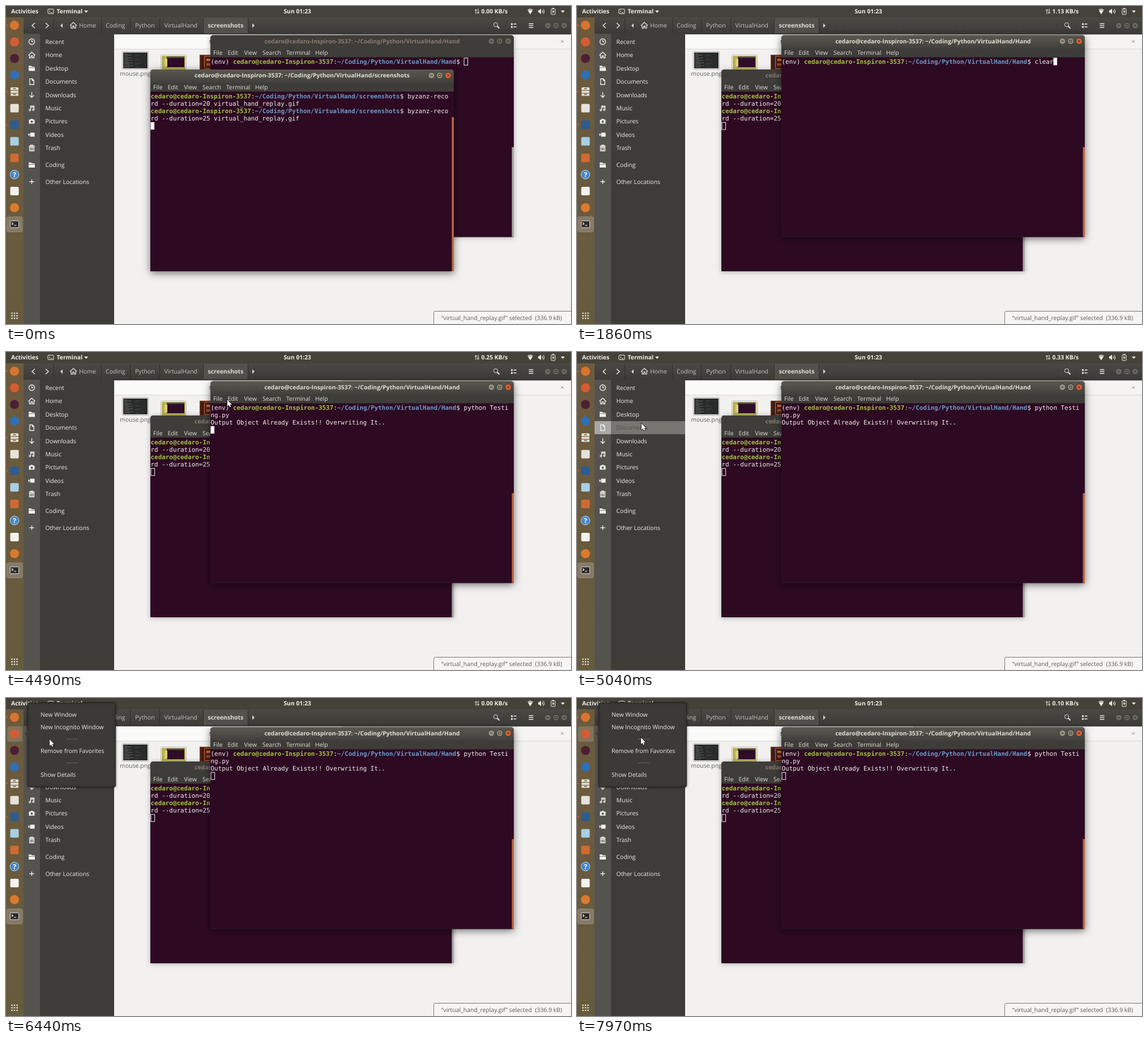
Recreate the animation shown at these times as an HTML page with a canvas. Size 998x561 px, loop 8000 ms.

```html
<!DOCTYPE html>
<html lang="en">
<head>
<meta charset="utf-8">
<title>Desktop session</title>
<style>
  html, body { margin: 0; width: 100%; height: 100%; overflow: hidden; background: #f2f1f0; }
  canvas { display: block; }
</style>
</head>
<body>
<canvas id="stage" width="998" height="561"></canvas>
<script>
const LOOP = 8000;
const ctx = document.getElementById('stage').getContext('2d');
const UI = '"Open Sans", "Noto Sans", sans-serif';
const MONO = '"DejaVu Sans Mono", monospace';
const CELL = 6.575, LINE = 13.15;
const USER = 'cedaro', HOST = USER + '@' + USER + '-Inspiron-3537';
const DIR = '~/Coding/Python/VirtualHand/';

// ---------- drawing helpers ----------
function rect(x, y, w, h, fill) {
  ctx.fillStyle = fill;
  ctx.fillRect(x, y, w, h);
}
function round(x, y, w, h, r, fill, stroke) {
  ctx.beginPath();
  ctx.roundRect(x, y, w, h, r);
  if (fill) { ctx.fillStyle = fill; ctx.fill(); }
  if (stroke) { ctx.strokeStyle = stroke; ctx.lineWidth = 1; ctx.stroke(); }
}
function circle(x, y, r, fill, stroke) {
  ctx.beginPath();
  ctx.arc(x, y, r, 0, 7);
  if (fill) { ctx.fillStyle = fill; ctx.fill(); }
  if (stroke) { ctx.strokeStyle = stroke; ctx.lineWidth = 0.9; ctx.stroke(); }
}
function shade(y, h, top, bottom) {
  const g = ctx.createLinearGradient(0, y, 0, y + h);
  g.addColorStop(0, top);
  g.addColorStop(1, bottom);
  return g;
}
// y is the middle of the capital letters
function label(str, x, y, color, { bold = false, size = 10.45, align = 'left' } = {}) {
  ctx.font = (bold ? 'bold ' : '') + size + 'px ' + UI;
  ctx.textAlign = align;
  ctx.fillStyle = color;
  ctx.fillText(str, x, y + size * 0.36);
}
function mono(str, x, y, color, bold) {
  ctx.font = (bold ? 'bold ' : '') + '10.92px ' + MONO;
  ctx.textAlign = 'left';
  ctx.fillStyle = color;
  ctx.fillText(str, x, y + 10.6);
  return x + str.length * CELL;
}
function icon(d, x, y, color, filled, width = 1.3) {
  const path = new Path2D(d);
  ctx.save();
  ctx.translate(x, y);
  ctx.lineWidth = width;
  ctx.strokeStyle = ctx.fillStyle = color;
  filled ? ctx.fill(path) : ctx.stroke(path);
  ctx.restore();
}

// ---------- pointer ----------
const track = [
  [400, 722, 460], [820, 778, 366], [960, 778, 366], [1360, 857, 281], [1820, 857, 281],
  [2900, 858, 134], [3480, 730, 89], [3630, 730, 89], [4390, 420, 80], [4440, 420, 80],
  [4800, 215, 112], [5040, 114, 126], [5250, 106, 123], [5600, 16, 62], [5950, 16, 62],
  [6440, 77, 73], [6770, 77, 73], [6820, 78, 72], [7050, 78, 72], [7290, 97, 57],
  [7600, 109, 74], [7810, 109, 74], [7970, 113, 70]
];
function pointerAt(t) {
  if (t < 400 || (t >= 1820 && t < 2900)) return null;
  const i = track.findIndex(k => k[0] > t);
  if (i < 0) return track.at(-1).slice(1);
  const [t0, x0, y0] = track[i - 1], [t1, x1, y1] = track[i];
  const p = (t - t0) / (t1 - t0);
  return [x0 + (x1 - x0) * p, y0 + (y1 - y0) * p];
}
function drawPointer([x, y]) {
  const inside = (l, t, r, b) => x > l && x < r && y > t && y < b;
  if (inside(361, 91, 893, 407) || inside(255, 151, 787, 468)) {
    icon('M-2.5-5.5H-.6M.6-5.5H2.5M0-5.5V5.5M-2.5 5.5H-.6M.6 5.5H2.5', x, y, '#e8e6e8', false, 1);
    return;
  }
  const arrow = 'M0 0V11.2L2.6 8.9 4.3 12.7 6.2 11.8 4.5 8.2H8Z';
  icon(arrow, x, y, '#161616', false, 1.5);
  icon(arrow, x, y, '#fff', true);
}

// ---------- panel and dock ----------
const speeds = [[0, '0.00'], [590, '0.49'], [1590, '1.13'], [2590, '0.00'], [3570, '0.25'],
  [4590, '0.33'], [5590, '0.66'], [6400, '0.00'], [7590, '0.10']];

function drawPanel(t) {
  const white = '#f2f0ea', bold = { bold: true, size: 10.35 };
  rect(0, 0, 998, 20, '#45423a');
  label('Activities', 9, 9.5, white, bold);
  round(74, 5.5, 10, 8, 1, null, white);
  icon('M76 8l2 1.6-2 1.6M79 11.5h3', 0, 0, white, false, 0.9);
  label('Terminal', 89.5, 9.5, white, bold);
  icon('M0 0H7L3.5 4Z', 138, 8, white, true);
  label('Sun 01:23', 514.7, 9.5, white, { ...bold, align: 'center' });
  icon('M2 9V1M0 3.2L2 .8 4 3.2M6 0V8M4 5.8L6 8.2 8 5.8', 828, 5, white, false, 1);
  label(speeds.findLast(s => s[0] <= t)[1] + ' KB/s', 839.5, 9.5, white, bold);
  icon('M-5-4Q0-8 5-4L0 4Z', 926, 10.5, '#b5b1a7', true);
  icon('M-3.5-1.5Q0-4 3.5-1.5L0 4Z', 926, 10.5, white, true);
  icon('M-5-2H-3L0-5V5L-3 2H-5Z', 945, 9.5, white, true);
  icon('M2-2Q3.5 0 2 2M4-4Q7 0 4 4', 945, 9.5, white, false, 1.1);
  round(963, 5, 7, 10, 1, null, white);
  rect(965, 3.5, 3, 1.5, white);
  icon('M4 0L1.5 4H3.5L2.5 7 6 2.8H4Z', 963, 6.5, white, true);
  icon('M0 0H7L3.5 4Z', 980, 8, white, true);
}

const dockIcons = [
  ['circle', '#d9742f'], ['circle', '#d65b35'], ['circle', '#4b2035'], ['circle', '#2f6fb6'], ['files'],
  ['square', '#e5e2db'], ['square', '#2d5c8e'], ['square', '#a9cfe3'], ['square', '#cf6a34'], ['help'],
  ['square', '#f4f3ef'], ['circle', '#dc7a2c'], ['terminal']
];
function drawDock(menuOpen) {
  rect(0, 20, 31, 541, shade(20, 541, '#6d5a3e', '#675b3e'));
  if (menuOpen) round(2, 50, 27, 27, 3, '#81745c');
  round(1.5, 372, 27.5, 26.5, 3, '#857a68', '#958a76');
  dockIcons.forEach(([kind, color], i) => {
    const y = 34 + i * 29.25;
    if (kind === 'circle') circle(15, y, 8, color);
    if (kind === 'square') round(7.5, y - 7.5, 15, 15, 2, color);
    if (kind === 'files') {
      round(8, y - 7.5, 14, 15, 1.5, '#e9e3d3');
      rect(8, y - 2.5, 14, 1.2, '#675e50');
      rect(8, y + 2.3, 14, 1.2, '#675e50');
      rect(12.5, y - 5.8, 5, 1.6, '#675e50');
      rect(12.5, y + 4.2, 5, 1.6, '#675e50');
    }
    if (kind === 'help') {
      circle(15, y, 7.8, '#4786c9', '#d4e1ee');
      label('?', 15, y, '#fff', { bold: true, size: 12, align: 'center' });
    }
    if (kind === 'terminal') {
      round(7.5, y - 6, 15, 12, 1.5, '#2c2b2a', '#e6e4de');
      icon('M10-3l2.5 2-2.5 2M14 2h4', 0, y, '#fff', false, 1.1);
    }
    if ([0, 4, 6, 12].includes(i)) circle(2, y, 1.3, '#dd5a2c');
  });
  for (let i = 0; i < 9; i++) circle(10.5 + (i % 3) * 4.5, 542 + Math.floor(i / 3) * 4.5, 1.3, '#f1eee6');
}

// ---------- file manager ----------
const HOME = 'M-6 .5L0-5 6 .5M-4 0V5H-1.2V1.5H1.2V5H4V0';
const FOLDER = 'M-5.5-4.5H-1L0-3H5V-1.5H-5.5ZM-5.5-.7H5.5V4.5H-5.5Z';
const places = [
  ['Recent', 'M5 0A5 5 0 1 1 -5 0A5 5 0 1 1 5 0M0-3V0H2.5', 63],
  ['Home', HOME, 86.5],
  ['Desktop', FOLDER, 110, true],
  ['Documents', 'M-3.7-5H1L3.7-2.2V5H-3.7ZM1-5V-2H3.7', 133.5],
  ['Downloads', 'M0-5V4M-3.8 .5L0 4.3 3.8 .5', 157],
  ['Music', 'M-2 3V-4H4V2.5M-2-2H4M-2 3A1.3 1.3 0 1 1 -4.6 3A1.3 1.3 0 1 1 -2 3M4 2.5A1.3 1.3 0 1 1 1.4 2.5A1.3 1.3 0 1 1 4 2.5', 180.5],
  ['Pictures', 'M-5-3H-2.5L-1.5-4.5H1.5L2.5-3H5V4H-5ZM2 .5A2 2 0 1 0 -2 .5A2 2 0 1 0 2 .5', 203.5, true],
  ['Videos', 'M-3-3.5H5V3.5H-3ZM-3 0L-6-2.5V2.5Z', 227, true],
  ['Trash', 'M-5-3.5H5M-2-3.5V-5.2H2V-3.5M-4-1.5V5H4V-1.5ZM-1.5-1V5M1.5-1V5', 250.5],
  ['Coding', FOLDER, 280.5, true],
  ['Other Locations', 'M-4 0H4M0-4V4', 310]
];
function drawSidebar(pointer) {
  rect(31, 49, 29, 512, '#55534e');
  rect(60, 49, 131, 512, '#3d3c38');
  for (const [name, path, y, filled] of places) {
    const over = pointer && pointer[0] > 31 && pointer[0] < 191 && Math.abs(pointer[1] - y) < 11.6;
    if (over) {
      rect(31, y - 11.5, 29, 23, '#a9a8a4');
      rect(60, y - 11.5, 131, 23, '#777671');
    }
    icon(path, 45.5, y, '#f3f2ee', filled);
    label(name, 69.5, y, over ? '#53524d' : '#f0efea');
  }
}
function drawHeader() {
  const tone = '#c6c3ba';
  rect(31, 20, 967, 30, shade(20, 30, '#4a4944', '#3b3a36'));
  rect(348, 21, 79, 27, '#53514c');
  for (const x of [84, 168, 219, 271, 348, 427]) rect(x, 21, 1, 27, '#2f2e2b');
  icon('M3-4.5L-2 0 3 4.5', 48, 34.5, '#e9e7e0', false, 1.5);
  icon('M-3-4.5L2 0-3 4.5', 73, 34.5, '#e9e7e0', false, 1.5);
  icon('M2-4L-2 0 2 4Z', 98, 34.5, '#d9d6cd', true);
  icon('M-2-4L2 0-2 4Z', 437, 34.5, '#d9d6cd', true);
  icon(HOME, 119, 34, '#e0ddd4');
  [['Home', 129], ['Coding', 176], ['Python', 228], ['VirtualHand', 279.5]]
    .forEach(([name, x]) => label(name, x, 34.5, tone, { size: 10.55 }));
  label('screenshots', 356.5, 34.5, '#dedbd2', { bold: true, size: 10.5 });
  circle(865, 33, 3.6, null, '#f0eee8');
  icon('M0 0L4 4', 867.5, 35.5, '#f0eee8', false, 1.8);
  for (const y of [30.5, 35.5]) {
    rect(892, y, 3, 3, '#e9e7e0');
    rect(896.5, y + 0.5, 5, 1.6, '#e9e7e0');
  }
  for (const y of [30.5, 33.7, 37]) rect(923.5, y, 8, 1.5, '#e9e7e0');
  drawButtons([957, 971.5, 986], 34.5, false);
}
function drawThumbnails() {
  round(205.5, 80.5, 46, 31, 1, '#fff', '#a5a4a2');
  rect(207, 82, 43, 28, '#2a2b2b');
  for (let row = 0; row < 11; row++) {
    rect(209, 84 + row * 2.3, 5 + (row * 7) % 13, 0.8, '#6b6d6c');
    if (row % 3) rect(228, 84 + row * 2.3, 3 + (row * 5) % 9, 0.7, '#4b4d4d');
  }
  label('mouse.png', 228.5, 119, '#65635f', { align: 'center' });
  round(273.5, 86.5, 45, 25, 1, '#fff', '#b3b2ad');
  rect(275, 88, 42, 23, '#b8b04c');
  rect(284, 89, 31, 19, '#2f0c27');
  rect(284, 89, 31, 2.5, '#57564b');
  rect(280, 93, 5, 14, '#d6cf80');
  rect(342, 86, 45, 26, '#6b2f1c');
  rect(344, 88, 6, 23, '#3e1c18');
  round(350.5, 88.5, 30, 22, 1, '#4a211b', '#cf7038');
  rect(354, 93, 10, 4, '#cf7038');
  rect(354, 101, 10, 4, '#a4552f');
}
function drawFiles(pointer) {
  rect(191, 49, 807, 512, '#f2f1f0');
  rect(192, 50, 402, 26, '#fafaf9');
  rect(594, 50, 404, 26, '#f5f4f3');
  rect(594, 50, 404, 1, '#c9c7c3');
  rect(191, 75.5, 807, 1, '#d8d6d3');
  label('screenshots', 359, 62.5, '#5b5955', { bold: true });
  icon('M-2-2L2 2M2-2L-2 2', 982.5, 62.5, '#77746f', false, 1);
  drawThumbnails();
  drawHeader();
  drawSidebar(pointer);
  round(755.5, 538.5, 250, 30, [3, 0, 0, 0], '#f6f5f4', '#777572');
  label('“virtual_hand_replay.gif” selected  (336.9 kB)', 875.5, 550, '#5d5b57', { align: 'center' });
}

// ---------- terminals ----------
function drawButtons(xs, y, focused) {
  xs.forEach((x, i) => {
    const close = i === 2 && focused;
    circle(x, y, 5.6, close ? '#dc6137' : focused ? '#949080' : '#6a6861', '#33322e');
    const sign = ['M-2.3 0H2.3', 'M-2-2H2V2H-2Z', 'M-2-2L2 2M2-2L-2 2'][i];
    icon(sign, x, y, '#38342e', false, 1);
  });
}
function drawWindow(x, y, dir, thumbY, focused) {
  const w = 536, h = 356;
  ctx.save();
  ctx.shadowColor = focused ? 'rgba(0,0,0,.55)' : 'rgba(0,0,0,.3)';
  ctx.shadowBlur = focused ? 14 : 8;
  ctx.shadowOffsetY = focused ? 3 : 1;
  round(x, y, w, h, [5, 5, 0, 0], '#3d3c38');
  ctx.restore();
  round(x, y, w, 24, [5, 5, 0, 0], focused ? shade(y, 24, '#5a5850', '#403f3a') : '#3e3d39');
  label(HOST + ': ' + DIR + dir, x + w / 2, y + 10.5, focused ? '#e3dfd4' : '#8c7a70',
    { bold: true, size: 10.4, align: 'center' });
  drawButtons([x + 496.5, x + 511, x + 526], y + 10.5, focused);
  [['File', 5], ['Edit', 30.5], ['View', 59.5], ['Search', 92], ['Terminal', 134], ['Help', 185]]
    .forEach(([name, dx]) => label(name, x + dx, y + 31, '#e2dfd6'));
  rect(x, y + 39, w, h - 39, '#2d0a22');
  rect(x + w - 3.5, thumbY, 3.5, y + h - thumbY, focused ? '#bf663e' : '#a9a6a6');
}
function drawPrompt(x, y, dir, command) {
  x = mono(HOST, x, y, '#a2c443', true);
  x = mono(':', x, y, '#eee', false);
  x = mono(DIR + dir, x, y, '#6c9bcb', true);
  return mono('$ ' + command, x, y, '#f3f0f2', false);
}
function drawCaret(x, y, focused, lit) {
  if (!focused) {
    ctx.strokeStyle = '#f0edf0';
    ctx.lineWidth = 1;
    ctx.strokeRect(x + 0.5, y + 0.5, CELL, LINE - 0.6);
  } else if (lit) rect(x, y, CELL, LINE, '#fff');
}
function drawRecorder(t, focused) {
  const x = 255.5, y = 152.3;
  drawWindow(255, 112, 'screenshots', 196, focused);
  [20, 25].forEach((seconds, i) => {
    drawPrompt(x, y + i * 2 * LINE, 'screenshots', 'byzanz-reco');
    mono(`rd --duration=${seconds} virtual_hand_replay.gif`, x, y + (i * 2 + 1) * LINE, '#f3f0f2');
  });
  drawCaret(x, y + 4 * LINE, focused, t < 520 || t >= 1120);
}
function drawRunner(t, focused, menuOpen) {
  const x = 361.5, y = 91.3;
  drawWindow(361, 51.5, 'Hand', 249, focused);
  const afterEnv = mono('(env) ', x, y, '#f3f0f2');
  const command = t < 1860 ? '' : t < 2200 ? 'clear' : 'python Testi';
  let caretX = drawPrompt(afterEnv, y, 'Hand', command), caretRow = 0;
  if (t >= 2200) {
    caretX = mono('ng.py', x, y + LINE, '#f3f0f2');
    caretRow = 1;
  }
  if (t >= 2770) {
    caretX = x;
    caretRow = t < 3000 ? 2 : 3;
  }
  if (t >= 3000) mono('Output Object Already Exists!! Overwriting It..', x, y + 2 * LINE, '#f3f0f2');
  const lit = t < 2770 || (t - 2770) % 1200 < 600;
  drawCaret(caretX, y + caretRow * LINE, focused && !menuOpen, lit);
}

// ---------- dock menu ----------
function drawMenu(pointer) {
  ctx.save();
  ctx.shadowColor = 'rgba(0,0,0,.5)';
  ctx.shadowBlur = 4;
  round(38.5, 8.5, 155, 148.5, 3, '#3b3a36', '#242321');
  ctx.restore();
  icon('M39.5 56L33 63 39.5 70Z', 0, 0, '#3b3a36', true);
  [['New Window', 29.5], ['New Incognito Window', 51], ['Remove from Favorites', 93.5], ['Show Details', 135.5]]
    .forEach(([name, y]) => {
      const over = pointer[0] > 39 && Math.abs(pointer[1] - y) < 10.5;
      if (over) rect(39, y - 10.5, 154, 21, '#504f4a');
      label(name, 61, y, '#efede7');
    });
  for (const y of [72, 114]) rect(107, y, 21, 1, '#66645e');
}

function frame(now) {
  const t = now % LOOP;
  const pointer = pointerAt(t);
  const menuOpen = t >= 5980, runnerFocused = t >= 1500;
  ctx.textRendering = 'geometricPrecision';
  drawFiles(menuOpen ? null : pointer);
  if (runnerFocused) {
    drawRecorder(t, false);
    drawRunner(t, true, menuOpen);
  } else {
    drawRunner(t, false, menuOpen);
    drawRecorder(t, true);
  }
  drawPanel(t);
  drawDock(menuOpen);
  if (menuOpen) drawMenu(pointer);
  if (pointer) drawPointer(pointer);
  requestAnimationFrame(frame);
}
requestAnimationFrame(frame);
</script>
</body>
</html>
```
